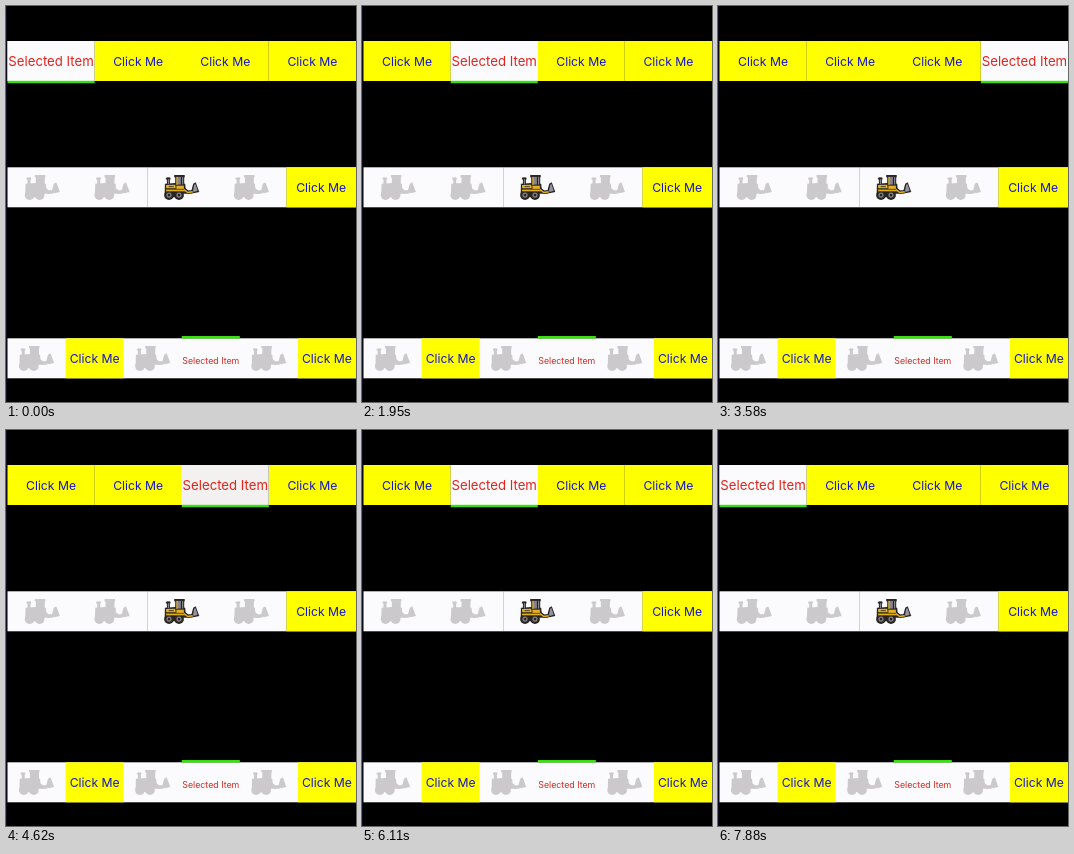
An HTML page with a canvas for the animation above (8000 ms loop, 350 by 396 pixels).

```html
<!DOCTYPE html>
<html lang="en">
<head>
<meta charset="utf-8">
<title>Segmented controls</title>
<style>
  html, body { margin: 0; width: 100%; height: 100%; overflow: hidden; background: #000; }
  canvas { display: block; width: 350px; height: 396px; }
</style>
</head>
<body>
<canvas id="stage"></canvas>
<script>
const W = 350, H = 396, LOOP = 8000;
const TICK = 148.6;   // the picture refreshes in even ticks
const MOVE = 300;     // slide time of the indicator
const FLASH = 140;    // brief tint after a cell becomes selected
const LEFT = 1.5;

const YELLOW = '#ffff00', PAPER = '#fbfbfd', GREEN = '#35e00c';
const BLUE = '#1414cc', RED = '#e3231c';

// The selection walks right, then back.
const moves = [
  { at: 1080, from: 0, to: 1 },
  { at: 2150, from: 1, to: 2 },
  { at: 3100, from: 2, to: 3 },
  { at: 4300, from: 3, to: 2 },
  { at: 5560, from: 2, to: 1 },
  { at: 6716, from: 1, to: 0 }
];

const canvas = document.getElementById('stage');
const ctx = canvas.getContext('2d');
const dpr = window.devicePixelRatio || 1;
canvas.width = W * dpr;
canvas.height = H * dpr;

const ease = p => p < 0.5 ? 2 * p * p : 1 - 2 * (1 - p) * (1 - p);

function rect(x, y, w, h, color) {
  ctx.fillStyle = color;
  ctx.fillRect(x, y, w, h);
}

function label(text, x, y, size, color) {
  ctx.font = `400 ${size}px Inter, Roboto, sans-serif`;
  ctx.textAlign = 'center';
  ctx.fillStyle = color;
  ctx.fillText(text, x, y);
}

function poly(points, color) {
  ctx.beginPath();
  points.forEach(([x, y]) => ctx.lineTo(x, y));
  ctx.closePath();
  ctx.fillStyle = color;
  ctx.fill();
}

function disc(x, y, r, color) {
  ctx.beginPath();
  ctx.arc(x, y, r, 0, Math.PI * 2);
  ctx.fillStyle = color;
  ctx.fill();
}

function line(points, width, color) {
  ctx.beginPath();
  points.forEach(([x, y]) => ctx.lineTo(x, y));
  ctx.lineWidth = width;
  ctx.strokeStyle = color;
  ctx.lineJoin = 'round';
  ctx.stroke();
}

function silhouette(color) {
  rect(10.5, 0.3, 10.5, 2.4, color);
  rect(11.5, 2, 9, 9, color);
  rect(3.2, 2.8, 3, 7, color);
  rect(2.2, 3, 4.6, 1.8, color);
  poly([[1.2, 9], [11.5, 8.4], [21.5, 9], [22.5, 19], [1, 19]], color);
  disc(5.3, 20.4, 4.9, color);
  disc(15.3, 20.4, 4.9, color);
  rect(5, 18, 10, 4.5, color);
  line([[20, 14.5], [24, 17.5], [29, 17]], 3.6, color);
  poly([[27.5, 16.5], [29.5, 9], [32, 7.6], [35.6, 17.2], [30, 18.6]], color);
}

function paintDetails() {
  const gold = '#e2b021', dark = '#292522', steel = '#85828a';
  rect(12.7, 2.2, 6.8, 7.6, steel);
  rect(12.7, 2.2, 1.2, 8, gold);
  rect(17.2, 2.2, 1.1, 8, dark);
  rect(4.2, 4.5, 1.1, 5, steel);
  poly([[2.4, 10.4], [11.5, 10], [12, 13.6], [2.4, 13.6]], gold);
  rect(12.7, 11, 7.5, 3.2, gold);
  rect(2.4, 14.9, 18.7, 1.7, gold);
  rect(5, 11.6, 5, 0.8, dark);
  for (const x of [5.3, 15.3]) {
    disc(x, 20.4, 2.6, steel);
    disc(x, 20.4, 1.3, dark);
  }
  line([[20.3, 15], [24, 17.8], [29, 17]], 1.5, gold);
  poly([[29.3, 16], [30.6, 9.8], [31.7, 9.3], [34, 16], [30, 17.2]], '#9592a0');
}

function loader(x, y, active) {
  ctx.save();
  ctx.translate(x, y);
  silhouette(active ? '#292522' : '#cbc9cc');
  if (active) paintDetails();
  ctx.restore();
}

function topState(t) {
  const move = moves.filter(m => m.at <= t).pop();
  if (!move) return { bar: 0, selected: 0, flash: false };
  const age = t - move.at;
  const p = Math.min(1, age / MOVE);
  return {
    bar: move.from + (move.to - move.from) * ease(p),
    selected: p < 1 ? move.from : move.to,
    flash: p === 1 && age < MOVE + FLASH
  };
}

function drawTop(t) {
  const cell = (W - LEFT) / 4;
  const { bar, selected, flash } = topState(t);
  rect(LEFT, 35, W - LEFT, 40, YELLOW);
  const x = LEFT + selected * cell;
  rect(x, 35, cell, 40, flash ? '#f2f1f0' : PAPER);
  for (const n of [1, 3]) rect(Math.floor(LEFT + n * cell), 35, 1, 40, 'rgba(90,90,70,.28)');
  for (let i = 0; i < 4; i++) {
    const mid = LEFT + (i + 0.5) * cell;
    if (i === selected) label('Selected Item', mid, 60.1, 13.2, RED);
    else label('Click Me', mid, 59.7, 12.2, BLUE);
  }
  rect(LEFT + bar * cell, 74.8, cell, 2.4, GREEN);
}

function drawMiddle() {
  const cell = (W - LEFT) / 5;
  rect(LEFT, 161.3, W - LEFT, 40, PAPER);
  rect(LEFT + 4 * cell, 161.3, cell, 40, YELLOW);
  for (const n of [2, 4]) rect(Math.round(LEFT + n * cell), 161.3, 1, 40, 'rgba(90,90,90,.24)');
  for (let i = 0; i < 4; i++) loader(18.3 + i * cell, 168.7, i === 2);
  label('Click Me', LEFT + 4.5 * cell, 185.8, 12.2, BLUE);
}

function drawBottom() {
  const cell = (W - LEFT) / 6;
  rect(LEFT, 332.3, W - LEFT, 40, PAPER);
  for (const i of [1, 5]) {
    rect(LEFT + i * cell, 332.3, cell, 40, YELLOW);
    label('Click Me', LEFT + (i + 0.5) * cell, 356.8, 12.2, BLUE);
  }
  for (const i of [0, 2, 4]) loader(12.5 + i * cell, 339.7, false);
  label('Selected Item', LEFT + 3.5 * cell, 357.7, 8.8, '#d5281f');
  rect(LEFT + 3 * cell, 330, cell, 2.5, GREEN);
}

function draw(now) {
  const t = Math.floor((now % LOOP) / TICK) * TICK;
  ctx.setTransform(dpr, 0, 0, dpr, 0, 0);
  rect(0, 0, W, H, '#000');
  rect(0, 0, 1, H, '#0c0b1e');
  drawTop(t);
  drawMiddle();
  drawBottom();
}

const start = performance.now();
function loop() {
  draw(performance.now() - start);
  requestAnimationFrame(loop);
}
loop();
</script>
</body>
</html>
```
